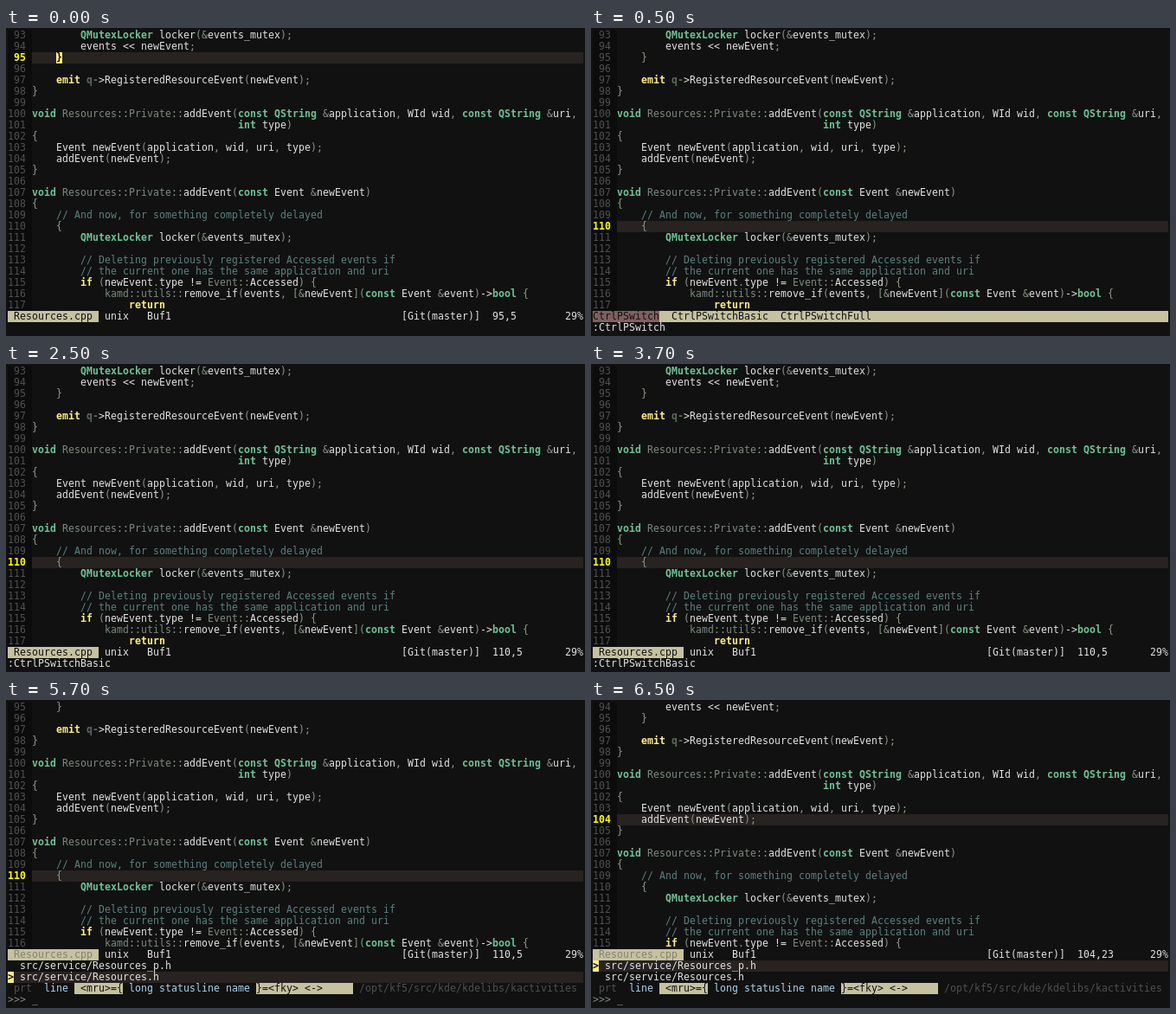
An HTML page with a canvas that plays this animation: 669 px wide and 356 px high, repeating every 8000 ms.

```html
<!DOCTYPE html>
<html lang="en">
<head>
<meta charset="utf-8">
<title>Editor buffer switch</title>
<style>
html, body { margin: 0; width: 100%; height: 100%; overflow: hidden; background: #111; }
canvas { display: block; }
</style>
</head>
<body>
<canvas id="screen" width="669" height="356"></canvas>
<script>
const ctx = document.getElementById('screen').getContext('2d');
const CW = 7, CH = 13, PAD = 2, COLS = 95;
const BG = '#111111', GUTTER = '#0c0c0c', LINE = '#282220', FG = '#e2e2e2',
  PUNCT = '#8c9a88', SCOPE = '#7c8a7e', DIM = '#505050', BAR = '#c5c1a1',
  YELLOW = '#ffee88', GREEN = '#6fc295', COMMENT = '#5c8080', BLUE = '#a9d4ec';

const FIRST = 93;
const code = `        QMutexLocker locker(&events_mutex);
        events << newEvent;
    }

    emit q->RegisteredResourceEvent(newEvent);
}

void Resources::Private::addEvent(const QString &application, WId wid, const QString &uri,
                                  int type)
{
    Event newEvent(application, wid, uri, type);
    addEvent(newEvent);
}

void Resources::Private::addEvent(const Event &newEvent)
{
    // And now, for something completely delayed
    {
        QMutexLocker locker(&events_mutex);

        // Deleting previously registered Accessed events if
        // the current one has the same application and uri
        if (newEvent.type != Event::Accessed) {
            kamd::utils::remove_if(events, [&newEvent](const Event &event)->bool {
                return`.split('\n');

// Syntax groups, in the order of the capture groups below
const styles = [[COMMENT], [GREEN, true], [YELLOW, true], ['#5c6a5c', true], [SCOPE], [PUNCT]];
const syntax = /(\/\/.*)|\b(void|const|int|bool|QString|QMutexLocker)\b|\b(emit|return|if)\b|\b(q-)(?=>)|(\w+)(?=::)|([(){}[\];,&:.])|\w+|./g;

function fill(col, row, n, color) {
  ctx.fillStyle = color;
  ctx.fillRect(PAD + col * CW, PAD + row * CH, n * CW, CH);
}

// Text on the terminal's character grid
function put(col, row, text, color = FG, bold = false) {
  ctx.font = `${bold ? 'bold ' : ''}11.5px "DejaVu Sans Mono", monospace`;
  ctx.fillStyle = color;
  [...text].forEach((ch, i) => {
    if (ch !== ' ') ctx.fillText(ch, PAD + (col + i) * CW, PAD + row * CH + 10);
  });
}

function drawCode(top, rows, current) {
  for (let row = 0; row < rows; row++) {
    const n = top + row, active = n === current;
    fill(0, row, 4, GUTTER);
    if (active) fill(4, row, COLS - 4, LINE);
    put(0, row, String(n).padStart(3), active ? '#ffff00' : DIM, active);
    for (const m of code[n - FIRST].matchAll(syntax)) {
      const group = m.slice(1).findIndex(Boolean);
      put(4 + m.index, row, m[0], ...(styles[group] || [FG]));
    }
  }
}

function drawStatus(row, pos, focused) {
  fill(0, row, 15, BAR);
  put(1, row, 'Resources.cpp', focused ? '#111111' : '#85836c');
  put(16, row, 'unix   Buf1');
  put(65, row, '[Git(master)]');
  put(80, row, pos);
  put(92, row, '29%');
}

function drawMenu() {
  fill(0, 25, COLS, BAR);
  fill(0, 25, 11, '#806060');
  put(0, 25, 'CtrlPSwitch  CtrlPSwitchBasic  CtrlPSwitchFull', '#111111');
}

function drawPicker(selected) {
  ['src/service/Resources_p.h', 'src/service/Resources.h'].forEach((path, i) => {
    const row = 23 + i;
    if (i === selected) {
      fill(0, row, COLS, LINE);
      fill(0, row, 1, YELLOW);
      put(0, row, '>', '#111111', true);
    }
    put(2, row, path);
  });
  put(1, 25, 'prt', DIM);
  put(6, 25, 'line', BLUE);
  fill(11, 25, 8, BAR);
  put(12, 25, '<mru>={', '#111111');
  put(20, 25, 'long statusline name', BLUE);
  fill(41, 25, 16, BAR);
  put(41, 25, '}=<fky> <->', '#111111');
  put(58, 25, '/opt/kf5/src/kde/kdelibs/kactivities', DIM);
  put(0, 26, '>>>', '#7c8a7e');
  put(4, 26, '_', '#8fb0b0');
}

const scenes = [
  [0, () => {
    drawCode(93, 25, 95);
    fill(8, 2, 1, YELLOW);
    put(8, 2, '}', '#111111', true);
    drawStatus(25, '95,5', true);
  }],
  [500, () => {
    drawCode(93, 25, 110);
    drawMenu();
    put(0, 26, ':CtrlPSwitch');
  }],
  [2500, () => {
    drawCode(93, 25, 110);
    drawStatus(25, '110,5', true);
    put(0, 26, ':CtrlPSwitchBasic');
  }],
  [4500, () => {
    drawCode(95, 22, 110);
    drawStatus(22, '110,5', false);
    drawPicker(1);
  }],
  [6500, () => {
    drawCode(94, 22, 104);
    drawStatus(22, '104,23', false);
    drawPicker(0);
  }]
];

const start = performance.now();
let shown;
function frame() {
  const t = (performance.now() - start) % 8000;
  const scene = scenes.findLast(([from]) => t >= from);
  if (scene !== shown) {
    shown = scene;
    ctx.fillStyle = BG;
    ctx.fillRect(0, 0, 669, 356);
    scene[1]();
  }
  requestAnimationFrame(frame);
}
frame();
</script>
</body>
</html>
```
